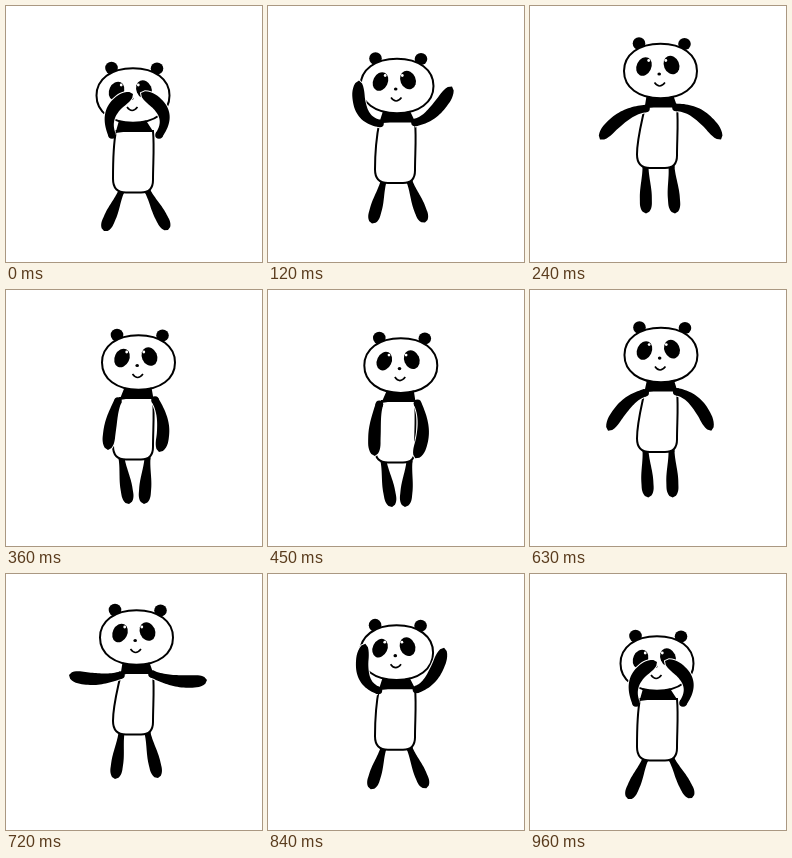
An HTML page with a canvas that plays this animation: 256 by 256 pixels, repeating every 990 ms.

```html
<!DOCTYPE html>
<html lang="en">
<head>
<meta charset="utf-8">
<title>Dancing panda</title>
<style>
  html, body { margin: 0; width: 100%; height: 100%; overflow: hidden; background: #fff; }
  canvas { display: block; width: 100vw; height: 100vh; }
</style>
</head>
<body>
<canvas id="stage" width="256" height="256"></canvas>
<script>
const ctx = document.getElementById('stage').getContext('2d');
const LOOP = 990, STEP = 30;

// Head x, collar x, left arm, right arm (shoulder, middle, hand), feet.
// Heights are measured from the collar line.
const cover  = [127, 110, 106, 4, 106, -20, 127, -37, 153, 4, 157, -19, 135, -38, 98, 100, 162, 99];
const open   = [128, 111, 108, 3, 98, -16, 106, -42, 151, 2, 163, -14, 162, -42, 101, 100, 160, 99];
const raised = [129, 111.5, 112, 2, 94, -11, 91, -41, 147, 1, 166, -10, 184, -35, 104, 102, 157, 101];
const level  = [130.5, 115, 115, 2, 90, 6, 63, 2, 146, 1, 172, 8, 201, 7, 109, 106, 152, 105];
const low    = [130.5, 115, 116, 2, 92, 11, 70, 33, 146, 1, 170, 9, 191, 33, 116, 107, 145, 107];
const rest   = [132.5, 114, 112, 3, 105, 25, 102, 52, 149, 2, 157, 27, 153, 54, 123, 106, 138, 106];

// Time, height of the collar line, pose
const keys = [
  [0, 125, cover], [60, 121, open], [120, 115.5, raised], [180, 107, level],
  [240, 100.5, low], [360, 108, rest], [540, 111, rest], [660, 97.5, low],
  [720, 99, level], [810, 110, raised], [885, 120, open], [960, 125, cover]
].map(([t, y, pose]) => ({ t, v: [y, ...pose] }));

function keyAt(i) {
  const n = keys.length, turn = Math.floor(i / n), k = keys[i - turn * n];
  return { t: k.t + turn * LOOP, v: k.v };
}

// Smooth curve through the keys
function poseAt(t) {
  let i = keys.length - 1;
  while (keys[i].t > t) i--;
  const [a, b, c, d] = [i - 1, i, i + 1, i + 2].map(keyAt);
  const h = c.t - b.t, u = (t - b.t) / h, u2 = u * u, u3 = u2 * u;
  return b.v.map((p, j) => {
    const q = c.v[j];
    const m0 = (q - a.v[j]) / (c.t - a.t) * h;
    const m1 = (d.v[j] - p) / (d.t - b.t) * h;
    return (2 * u3 - 3 * u2 + 1) * p + (u3 - 2 * u2 + u) * m0 +
           (3 * u2 - 2 * u3) * q + (u3 - u2) * m1;
  });
}

function dot(x, y, rx, ry = rx, turn = 0, color = '#000') {
  ctx.beginPath();
  ctx.ellipse(x, y, rx, ry, turn, 0, 7);
  ctx.fillStyle = color;
  ctx.fill();
}

function outline() {
  ctx.fillStyle = '#fff';
  ctx.fill();
  ctx.strokeStyle = '#000';
  ctx.lineWidth = 2;
  ctx.stroke();
}

// Bent, rounded limb that widens towards its end
function limb([sx, sy, mx, my, hx, hy], thin, wide) {
  const cx = 2 * mx - (sx + hx) / 2, cy = 2 * my - (sy + hy) / 2;
  const near = [], far = [], n = 28;
  for (let i = 0; i <= n; i++) {
    const t = i / n, r = 1 - t;
    const x = r * r * sx + 2 * r * t * cx + t * t * hx;
    const y = r * r * sy + 2 * r * t * cy + t * t * hy;
    const dx = r * (cx - sx) + t * (hx - cx), dy = r * (cy - sy) + t * (hy - cy);
    const s = Math.min(1, t / 0.65);
    const tip = Math.max(0, (t - 0.78) / 0.22);
    const w = (thin + (wide - thin) * s * s * (3 - 2 * s)) * Math.sqrt(1 - tip * tip) / Math.hypot(dx, dy);
    near.push([x - dy * w, y + dx * w]);
    far.unshift([x + dy * w, y - dx * w]);
  }
  ctx.beginPath();
  [...near, ...far].forEach(p => ctx.lineTo(...p));
  ctx.closePath();
  ctx.strokeStyle = '#fff';
  ctx.lineWidth = 2;
  ctx.stroke();
  ctx.fillStyle = '#000';
  ctx.fill();
  dot(sx, sy, thin);
}

function leg(hip, x, y) {
  limb([hip, 60, (hip + x) / 2, (60 + y) / 2, x, y], 3, 6);
}

function torso(left) {
  ctx.beginPath();
  ctx.moveTo(left, 0);
  ctx.bezierCurveTo(left - 3, 15, 107, 32, 107, 48);
  ctx.bezierCurveTo(107, 58, 113, 61.5, 120, 61.5);
  ctx.lineTo(135, 61.5);
  ctx.bezierCurveTo(143, 61.5, 147, 57, 147, 49);
  ctx.bezierCurveTo(147, 32, 148.5, 16, 147, 0);
  ctx.closePath();
  outline();
}

function head(x) {
  ctx.save();
  ctx.translate(x, -35.5);
  dot(-21.5, -27.5, 6.3, 6.3);
  dot(24, -27, 6.3, 6);
  const w = 36.5, h = 27.3, k = 0.6;
  ctx.beginPath();
  ctx.moveTo(-w, 0);
  ctx.bezierCurveTo(-w, -h * k, -w * k, -h, 0, -h);
  ctx.bezierCurveTo(w * k, -h, w, -h * k, w, 0);
  ctx.bezierCurveTo(w, h * k, w * k, h, 0, h);
  ctx.bezierCurveTo(-w * k, h, -w, h * k, -w, 0);
  outline();
  dot(-16.5, -4.5, 7.3, 9.7, 0.45);
  dot(11, -6, 7.6, 9.6, -0.4);
  dot(-11.8, -10.5, 1.4, 1.4, 0, '#fff');
  dot(5.3, -10.5, 1.4, 1.4, 0, '#fff');
  dot(-1.3, 3, 1.8, 1.6);
  ctx.beginPath();
  ctx.moveTo(-6, 11.5);
  ctx.quadraticCurveTo(-1, 18.5, 4.5, 11.5);
  ctx.strokeStyle = '#000';
  ctx.lineWidth = 1.6;
  ctx.stroke();
  ctx.restore();
}

function neck(x, left) {
  ctx.beginPath();
  ctx.moveTo(x - 14, -10.5);
  ctx.quadraticCurveTo(x, -6, x + 13, -10.5);
  ctx.lineTo(147.5, 1);
  ctx.quadraticCurveTo(130, -1.5, left - 0.5, 2);
  ctx.closePath();
  ctx.fillStyle = '#000';
  ctx.fill();
}

function draw(t) {
  const [y, x, left, ...p] = poseAt(t);
  ctx.fillStyle = '#fff';
  ctx.fillRect(0, 0, 256, 256);
  ctx.save();
  ctx.translate(0, y);
  leg(115.5, p[12], p[13]);
  leg(141.5, p[14], p[15]);
  torso(left);
  head(x);
  limb(p.slice(0, 6), 3.8, 6.2);
  limb(p.slice(6, 12), 3.8, 6.2);
  neck(x, left);
  ctx.restore();
}

const start = performance.now();
function tick() {
  const t = (performance.now() - start) % LOOP;
  draw(Math.floor(t / STEP) * STEP);
  requestAnimationFrame(tick);
}
tick();
</script>
</body>
</html>
```
